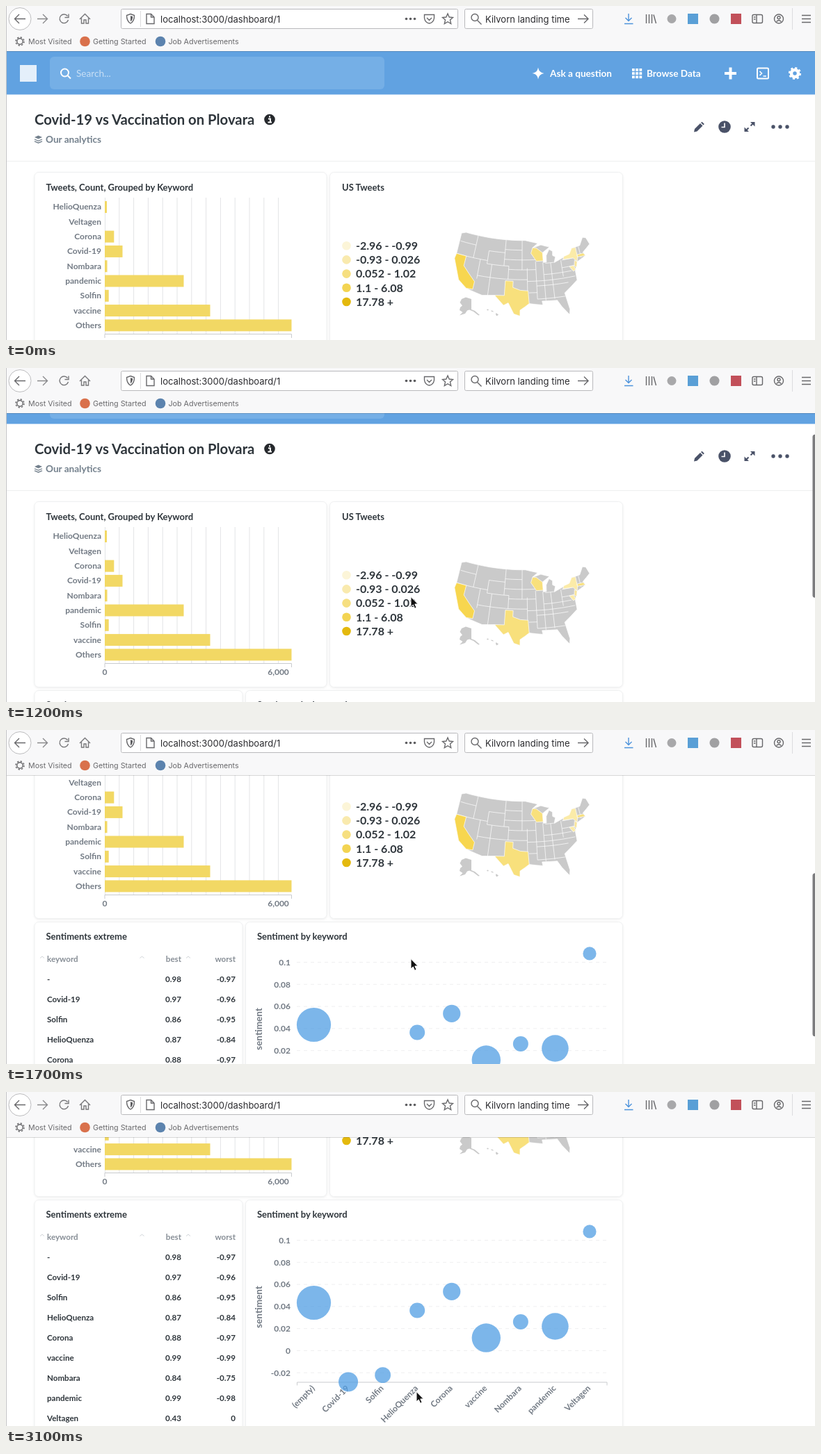
An HTML page that plays this animation: 1163x481 px, repeating every 3200 ms.

```html
<!DOCTYPE html>
<html lang="en">
<head>
<meta charset="utf-8">
<title>Dashboard scroll</title>
<style>
@property --s { syntax: '<number>'; inherits: true; initial-value: 0; }
html, body { margin: 0; width: 100%; height: 100%; overflow: hidden; background: #fff; }
svg { display: block; font-family: Lato, sans-serif; font-weight: 700; animation: scroll 3.2s step-end infinite; }
#page { transform: translateY(calc(var(--s) * -1px)); }
#thumb { transform: translateY(calc(var(--s) * .588px)); }
#bar { animation: bar 3.2s step-end infinite; }
#cursor { animation: cursor 3.2s step-end infinite; }
.ui { font-family: Inter, "Open Sans", sans-serif; font-weight: 400; }
.h { font-size: 13px; fill: #2e353b; }
.tick { font-size: 12px; fill: #727a84; }
.cell { font-size: 11.6px; fill: #2e353b; }
.head { font-size: 11.6px; fill: #878e96; }
.end { text-anchor: end; }
.mid { text-anchor: middle; }
.line { fill: none; stroke: #68686b; stroke-width: 1.4; }
.card { fill: #fff; stroke: #eff0f1; filter: drop-shadow(0 1px 1.5px #0001); }

/* one step every 100 ms */
@keyframes scroll {
  0% { --s: 0; }
  25% { --s: 0; animation-timing-function: steps(2); }
  31.25% { --s: 13; animation-timing-function: steps(2); }
  37.5% { --s: 47; animation-timing-function: steps(3); }
  46.875% { --s: 138; animation-timing-function: steps(2); }
  53.125% { --s: 235; animation-timing-function: steps(3); }
  62.5% { --s: 330; }
  65.625% { --s: 345; animation-timing-function: steps(2); }
  71.875%, 100% { --s: 356; }
}
@keyframes bar {
  0% { opacity: 0; }
  25% { opacity: 1; }
  87.5% { opacity: .5; }
  90.625%, 100% { opacity: 0; }
}
@keyframes cursor {
  0% { opacity: 0; transform: none; }
  15.625% { opacity: 1; transform: none; }
  75% { opacity: 1; transform: none; animation-timing-function: steps(6); }
  93.75%, 100% { opacity: 1; transform: translate(8px, 102px); }
}
</style>
</head>
<body>
<svg width="1163" height="481" viewBox="0 0 1163 481">
  <rect width="1163" height="481" fill="#fff"/>

  <g id="page">
    <!-- navigation -->
    <rect y="65" width="1163" height="62.500" fill="#61a2e1"/>
    <rect x="63" y="73" width="481" height="47" rx="6" fill="#75afe6"/>
    <rect x="20" y="85" width="24" height="24" fill="#e4effa"/>
    <g fill="none" stroke="#fff" stroke-width="2">
      <circle cx="84.500" cy="96" r="5.500"/><path d="M88.500 100l4.500 4.500"/>
      <rect x="1080" y="89.500" width="16" height="15" rx="1.500"/>
      <path d="M1083.500 94l3 3-3 3M1088.500 101h4.500" stroke-width="1.600"/>
      <path d="M1033 97h17M1041.500 88.500v17" stroke-width="4"/>
      <circle cx="1134" cy="97" r="5" stroke-width="4.500"/>
      <circle cx="1134" cy="97" r="7.800" stroke-width="2.600" stroke-dasharray="3.060"/>
    </g>
    <g fill="#fff" font-size="13.6">
      <text x="101" y="101.500" font-weight="400" opacity=".6">Search...</text>
      <path d="M765 88.500q1 7.500 8.500 8.500q-7.500 1-8.500 8.500q-1-7.500-8.500-8.500q7.500-1 8.500-8.500z"/>
      <text x="782" y="101.700">Ask a question</text>
      <g id="dots"></g>
      <text x="921" y="101.700">Browse Data</text>
    </g>

    <!-- title -->
    <text x="41" y="171" font-size="20.3" fill="#2e353b">Covid-19 vs Vaccination on Plovara</text>
    <circle cx="379" cy="163.500" r="7.800" fill="#26292d"/>
    <path d="M377 162.500h3v5M376.500 167.500h5.500M379 158.200v2.400" fill="none" stroke="#fff" stroke-width="1.900"/>
    <path d="M41 189l5.500-2.500 5.500 2.500-5.500 2.500z" fill="#74818d"/>
    <path d="M41 192l5.500 2.400 5.500-2.400M41 194.800l5.500 2.400 5.500-2.400" fill="none" stroke="#74818d" stroke-width="1.300"/>
    <text x="57" y="197" font-size="13.6" fill="#74818d">Our analytics</text>
    <g fill="#4a5268">
      <path d="M989 181.500l1-4.500 8-8 3.500 3.500-8 8zM999 168l1.500-1.300 3.400 3.400-1.400 1.500z"/>
      <circle cx="1033" cy="174" r="8.800"/>
      <path d="M1033 168.500v6h-4.500" fill="none" stroke="#fff" stroke-width="1.600"/>
      <path d="M1070 167h6.500v6.500zM1068 181h-6.500v-6.500z"/>
      <path d="M1070.500 172.500l4-4M1067.500 175.500l-4 4" stroke="#4a5268" stroke-width="2"/>
      <circle cx="1103" cy="174" r="2.700"/><circle cx="1113" cy="174" r="2.700"/><circle cx="1123" cy="174" r="2.700"/>
    </g>
    <path d="M0 223.500h1163" stroke="#eeefef"/>

    <!-- cards -->
    <rect class="card" x="41" y="239.500" width="420" height="267" rx="6"/>
    <rect class="card" x="465.500" y="239.500" width="421" height="267" rx="6"/>
    <rect class="card" x="41" y="511.500" width="299" height="360" rx="6"/>
    <rect class="card" x="344.500" y="511.500" width="542" height="360" rx="6"/>
    <g class="h">
      <text x="57.500" y="265.500">Tweets, Count, Grouped by Keyword</text>
      <text x="483" y="265.500">US Tweets</text>
      <text x="57.500" y="537">Sentiments extreme</text>
      <text x="361" y="537">Sentiment by keyword</text>
    </g>
    <g id="bars"></g>
    <g id="legend" font-size="16" fill="#2e353b"></g>
    <g id="map" stroke="#fff" stroke-width=".7" stroke-linejoin="round"></g>
    <g id="table"></g>
    <g id="scatter"></g>
  </g>

  <!-- browser -->
  <g class="ui">
    <rect width="1163" height="65" fill="#f8f8f9"/>
    <path d="M0 65.500h1163" stroke="#000" opacity=".15"/>
    <circle cx="20" cy="18.500" r="16" fill="#fff" stroke="#bcbcbe"/>
    <rect x="165.500" y="4.500" width="484" height="28" rx="2" fill="#fff" stroke="#b9b9bc"/>
    <rect x="659.500" y="4.500" width="184" height="28" rx="2" fill="#fff" stroke="#b9b9bc"/>
    <path d="M193.500 7v23M1130.500 3v31" stroke="#dcdcde"/>
    <g class="line">
      <path d="M28 18.500H13M19 12l-6.500 6.500 6.500 6.500"/>
      <path d="M45 18.500h14M53 12l6.500 6.500-6.500 6.500" stroke="#8a8a8d"/>
      <path d="M88.500 14.500a6.300 6.300 0 1 0 1 5.500M90 11.500v5h-5.500" stroke="#77777a"/>
      <path d="M106 19l7.500-7.500 7.500 7.500M108.500 17.500v7.500h3.500v-5h3v5h3.500v-7.500" stroke="#77777a"/>
      <path d="M179 11.500l5.500 2q0 8.500-5.500 11.500q-5.500-3-5.500-11.500z"/>
      <path d="M179 14v8.500q3-2 3.200-7.300z" fill="#5b5b5e" stroke="none"/>
      <path d="M202 11.500h6.500l4.500 4.500v9.500h-11zM208.500 11.500v4.500h4.500"/>
      <path d="M601.500 12.500h14v5q-1 6.500-7 7.500q-6-1-7-7.500zM605 17l3.500 3.500 3.500-3.500"/>
      <path d="M635 11l2.200 5 5.300.5-4 3.600 1.200 5.400-4.700-2.800-4.700 2.800 1.200-5.400-4-3.600 5.300-.5z"/>
      <circle cx="674" cy="16.500" r="5"/><path d="M677.500 20.500l6 6"/>
      <path d="M822 18.500h15M831 12.500l6 6-6 6"/>
      <path d="M895 11v10.500M890.500 17l4.500 4.500 4.500-4.500M889 25.500h12.500" stroke="#4d93dc"/>
      <path d="M920.500 12v13M924.500 12v13M928.500 12v13M931 12.500l3.500 12.500"/>
      <rect x="1073" y="12.500" width="14.500" height="12" rx="2"/><path d="M1079 12.500v12M1075 16h2.500M1075 19h2.500"/>
      <circle cx="1111" cy="18.500" r="6.500"/><circle cx="1111" cy="16.800" r="2"/><path d="M1107.500 22.500q3.500-3.500 7 0"/>
      <path d="M1144 13.500h13M1144 18.500h13M1144 23.500h13"/>
      <circle cx="20" cy="51" r="4.200"/><circle cx="20" cy="51" r="6" stroke-dasharray="2.350"/>
    </g>
    <g fill="#5b5b5e"><circle cx="575.500" cy="18.500" r="1.800"/><circle cx="581.500" cy="18.500" r="1.800"/><circle cx="587.500" cy="18.500" r="1.800"/></g>
    <circle cx="957" cy="18.500" r="6.500" fill="#a8a8aa"/>
    <rect x="980" y="11" width="15" height="15" fill="#5a9fd6"/>
    <circle cx="1018.500" cy="18.500" r="7" fill="#a0a0a2"/>
    <rect x="1042" y="11" width="15" height="15" fill="#c2505a"/>
    <circle cx="113.500" cy="51" r="7.300" fill="#d9714c"/>
    <circle cx="222" cy="51" r="7.300" fill="#5c83ae"/>
    <g font-size="13" fill="#2a2a2e">
      <text x="222" y="23.500">localhost:3000/dashboard/1</text>
      <text x="689" y="23.500">Kilvorn landing time</text>
    </g>
    <g font-size="10.7" fill="#68686b">
      <text x="32" y="55">Most Visited</text>
      <text x="125" y="55">Getting Started</text>
      <text x="233.500" y="55">Job Advertisements</text>
    </g>
  </g>
  <path d="M.5 0v481" stroke="#c4c4c6"/>

  <g id="bar"><rect id="thumb" x="1159.500" y="68" width="7" height="235" rx="3.500" fill="#7b7b7d"/></g>
  <path id="cursor" d="M582 329.500v14.500l3.300-3 2.300 5.300 2.500-1.100-2.300-5.200h4.500z" fill="#111" stroke="#fff"/>
</svg>

<script>
const put = (id, html) => document.getElementById(id).innerHTML = html;
const text = (x, y, s, cls = '', more = '') => `<text x="${x}" y="${y}" class="${cls}" ${more}>${s}</text>`;
const range = n => [...Array(n).keys()];

put('dots', range(9).map(i =>
  `<rect x="${900 + i % 3 * 5.2}" y="${90 + (i / 3 | 0) * 5.2}" width="3.8" height="3.8"/>`).join(''));

// Bar chart
const bars = { HelioQuenza: 3, Veltagen: 0, Corona: 13.3, 'Covid-19': 25.5, Nombara: 3.5,
  pandemic: 113.5, Solfin: 5.7, vaccine: 151.5, Others: 268.5 };
put('bars',
  range(12).map(i => `<path d="M${162.8 + i * 20.8} 276V473" stroke="#e3e4e6"/>`).join('') +
  '<path d="M142.500 276V473" stroke="#e3e4e6"/>' +
  Object.entries(bars).map(([name, w], i) => {
    const y = 289.4 + i * 21.3;
    return text(137, y + 4, name, 'tick end') +
      `<rect x="142" y="${y - 8.4}" width="${w}" height="17" fill="#f2d864"/>`;
  }).join('') +
  '<path d="M142 478v-5.500h268.500v5.500" fill="none" stroke="#c9cbce"/>' +
  text(142, 489, '0', 'tick mid') + text(391.5, 489, '6,000', 'tick mid'));

// Map legend
const tones = ['#fcf5d8', '#f9eaae', '#f6df80', '#f3d452', '#e4b90e'];
const spans = ['-2.96 - -0.99', '-0.93 - 0.026', '0.052 - 1.02', '1.1 - 6.08', '17.78 +'];
put('legend', spans.map((s, i) => {
  const y = 345.2 + i * 20.2;
  return `<circle cx="489.5" cy="${y}" r="6.3" fill="${tones[i]}"/>` + text(503, y + 5.8, s);
}).join(''));

// Map: Albers conic from longitude and latitude
const rad = Math.PI / 180, s1 = Math.sin(29.5 * rad), s2 = Math.sin(45.5 * rad);
const cone = (s1 + s2) / 2, base = 1 - s1 * s1 + 2 * cone * s1;
const rho = lat => Math.sqrt(base - 2 * cone * Math.sin(lat * rad)) / cone;
function project(lon, lat) {
  const a = cone * (lon + 96) * rad, r = rho(lat);
  return [744 + 269 * r * Math.sin(a), 389.5 - 269 * (rho(38) - r * Math.cos(a))].map(v => v.toFixed(1)).join(' ');
}
function trace(pts) {
  return 'M' + pts.flatMap(([x, y], i) => {
    const [u, v] = pts[i - 1] || [x, y], n = Math.ceil(Math.abs(x - u) / 3) || 1;
    return range(n).map(j => project(u + (x - u) * (j + 1) / n, v + (y - v) * (j + 1) / n));
  }).join('L');
}
const parse = list => list.split(/\s+/).map(p => p.split(',').map(Number));
const area = (list, fill) => `<path d="${trace(parse(list))}Z" fill="${fill}"/>`;

const pacific = '-117.1,32.5 -120.6,34.5 -121.9,36.6 -124.4,40.4 -124.2,42';
const gulf = '-94,29.7 -97.2,27.7 -97.2,25.9 -99.3,26.5 -101.4,29.8 -103,29 -106.5,31.8';
const coast = `-124.7,48.4 -122.8,49 -95.2,49 -89.6,48 -92,46.7 -88.2,47.4 -84.5,46.5 -87.8,45 -87.8,42 -86.5,42
  -86.3,44 -84.8,45.8 -83.4,45.1 -83.6,43.8 -82.5,43.3 -83.3,41.6 -79,42.8 -76.5,43.4 -75,45 -71.3,45.2 -69.2,47.4
  -67.8,47 -67,44.8 -70.7,43 -70,41.8 -74,40.6 -75.5,38 -75.6,35.2 -81,32 -80.1,26.8 -80.5,25.2 -82.7,28
  -84,30.1 -89.4,30.3 -89.2,29.1 ${gulf} -111,31.3 ${pacific}`;

// State lines: longitude with its two latitudes, latitude with its two longitudes
const meridians = [[-117, 42, 49], [-114, 36, 42], [-111, 41, 45], [-109, 31.3, 41], [-104, 41, 49], [-102, 37, 41],
  [-96.6, 40, 49], [-94.5, 33.6, 40.5], [-91, 31, 42.5], [-88, 30.4, 42], [-84.8, 30.7, 41.7], [-80.5, 37, 42], [-72, 41.5, 45]];
const parallels = [[46, -124, -117], [42, -124, -111], [45, -111, -104], [46, -104, -96.6], [43, -104, -91], [41, -111, -102],
  [40, -102, -91], [37, -114, -94.5], [36.5, -94.5, -76], [35, -91, -79], [33, -94, -91], [41.7, -87, -83.4],
  [39.7, -80.5, -75], [38.3, -88, -77], [31, -91, -81], [42, -80, -75]];
const lines = [...meridians.map(([x, a, b]) => [[x, a], [x, b]]), ...parallels.map(([y, a, b]) => [[a, y], [b, y]])];

const states = [
  [`-120,42 -120,39 -114.6,35 -114.7,32.6 ${pacific}`, '#f7d64f'],
  [`-103,32 -103,36.5 -100,36.5 -100,34.6 -97.2,33.8 -94.3,33.6 ${gulf}`, '#f8e07c'],
  ['-92,46.7 -92.8,45 -90.6,42.5 -87.8,42.5 -87.8,45 -90.4,46.6', '#f8e07c'],
  ['-79.5,42.1 -75.3,42 -74,40.6 -73.4,42 -73.3,45 -75,45 -76.5,43.4 -79,43', '#fbeba8'],
  ['-75.5,39.6 -74.9,41.2 -74,40.6 -74.7,39', '#f9e59a'],
  ['-73.4,42 -70,41.8 -70.8,42.7 -73.3,42.7', '#f8e07c'],
  ['-77.5,39.7 -75.8,39.7 -75.2,38.4 -76.3,38', '#fbeba8']
];
put('map',
  area(coast, '#cacaca') +
  `<path fill="none" d="${lines.map(trace).join('')}"/>` +
  states.map(s => area(...s)).join('') +
  `<path fill="#cacaca" stroke="none" d="M652.500 427l2.500-5 6-2.500 8 2.500v15l5 2 7 6-2 .5-7-5.500-6-2.500-3 1-3 4.500-8 2.500 4.500-4.500-4.500-3 1-4 3-2.500z
    M691 437l2-.5 1 1.500-2 .5zM697 438.500l3 .5 1 1.500-3-.5zM704.500 442l3.500 2.500-2.500 2-1.500-2z"/>`);

// Table
const rows = `- 0.98 -0.97|Covid-19 0.97 -0.96|Solfin 0.86 -0.95|HelioQuenza 0.87 -0.84|Corona 0.88 -0.97|
  vaccine 0.99 -0.99|Nombara 0.84 -0.75|pandemic 0.99 -0.98|Veltagen 0.43 0`.split('|');
const row = (line, y, cls) => {
  const [a, b, c] = line.trim().split(' ');
  return text(59, y, a, cls) + text(252, y, b, cls + ' end') + text(330, y, c, cls + ' end');
};
put('table', row('keyword best worst', 569, 'head') +
  [52, 195.5, 262].map(x => `<path d="M${x - 3} 563.500l3-2.500 3 2.500" fill="none" stroke="#cfd3d7"/>`).join('') +
  rows.map((r, i) => row(r, 597.5 + i * 29.1, 'cell')).join(''));

// Scatter: keyword, sentiment, radius
const bubbles = [['(empty)', .0434, 24.6], ['Covid-19', -.0283, 14], ['Solfin', -.0221, 11.4],
  ['HelioQuenza', .0365, 11], ['Corona', .0535, 12.6], ['vaccine', .0116, 20.7],
  ['Nombara', .0261, 11], ['pandemic', .022, 19.3], ['Veltagen', .1079, 9.6]];
const px = i => 442.5 + i * 49.56, py = v => 728.5 - v * 1590;
put('scatter',
  range(7).map(i => {
    const v = (i - 1) / 50;
    return text(409, py(v) + 4.2, v, 'tick end') +
      `<path d="M418 ${py(v)}H864" stroke="#efeff0" stroke-dasharray="5"/>`;
  }).join('') +
  '<path d="M418.500 778.500v-4.500h445.500v4.500" fill="none" stroke="#c9cbce"/>' +
  text(0, 0, 'sentiment', 'mid', 'transform="translate(368 665.500) rotate(-90)" font-size="13.6" fill="#727a84"') +
  bubbles.map(([s], i) => text(0, 0, s, 'tick end', `transform="translate(${px(i) + 2} 783.5) rotate(-45)"`)).join('') +
  bubbles.map(([, v, r], i) => `<circle cx="${px(i)}" cy="${py(v)}" r="${r}" fill="#509ee3" opacity=".75"/>`).join(''));
</script>
</body>
</html>
```
